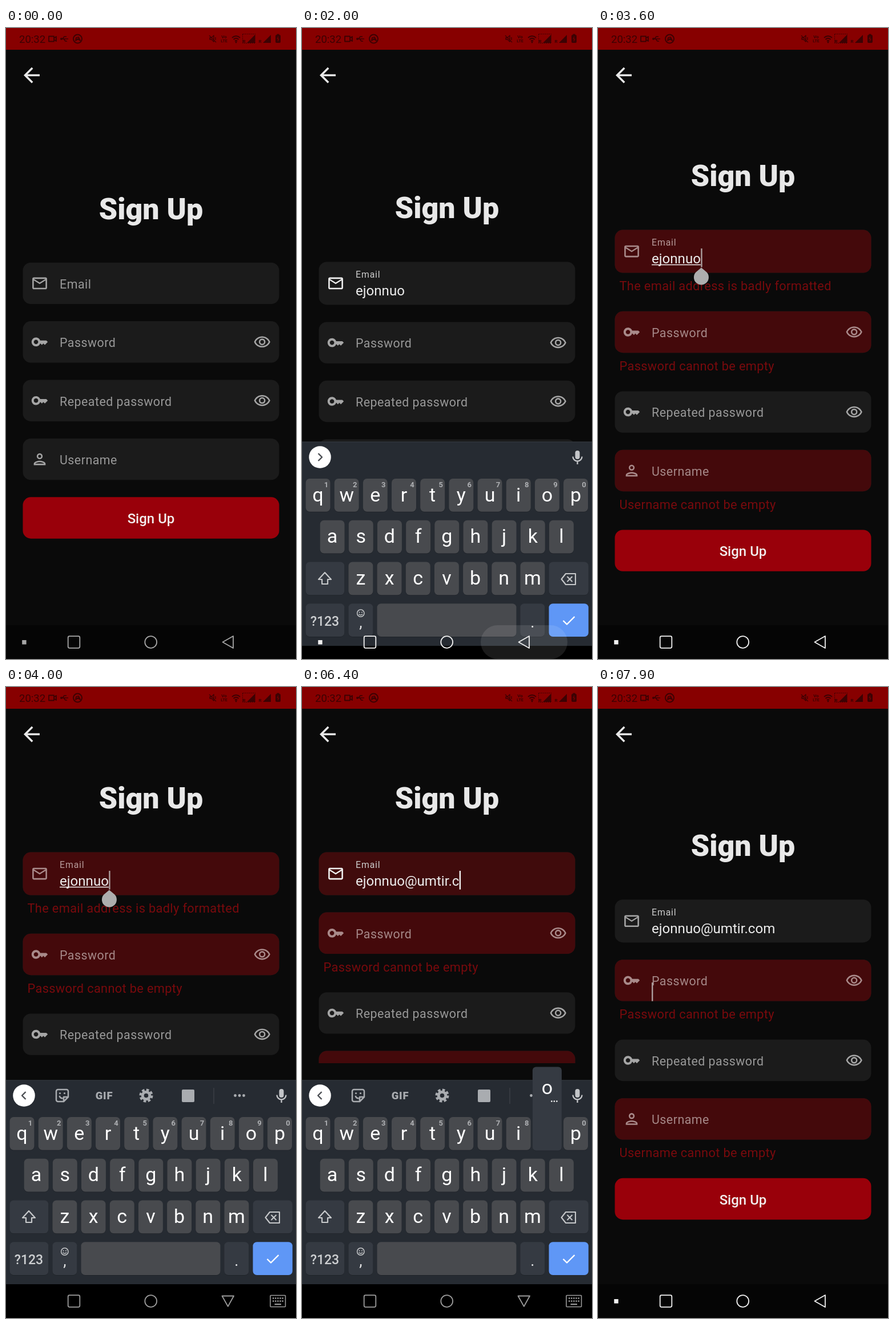
Animation of 508x1102 px, one loop 8000 ms. Source, as an HTML page:

```html
<!DOCTYPE html>
<html lang="en">
<head>
<meta charset="utf-8">
<title>Sign up form</title>
<style>
  html, body { margin: 0; width: 100%; height: 100%; overflow: hidden; background: #0a0a0a; }
  svg { display: block; width: 508px; height: 1102px; font-family: Roboto, sans-serif; }
  text { white-space: pre; }
  .title { font-size: 51.9px; font-weight: 900; fill: #e8e8e8; }
  .body { font-size: 21.8px; letter-spacing: .33px; }
  .typed { font-size: 24.1px; fill: #ededed; }
  .button { font-size: 24px; font-weight: 500; fill: #f2eeee; }
  .key { font-size: 34px; fill: #fff; }
  .hint { font-size: 13px; font-weight: 700; fill: #aeb0b3; }
  .mode { font-size: 23px; font-weight: 500; fill: #cdcfd1; }
  .mid { text-anchor: middle; }
  .line { fill: none; stroke-linejoin: round; }
</style>
</head>
<body>
<svg id="stage" viewBox="0 0 508 1102"></svg>
<script>
const LOOP = 8000, TICK = 100;
const stage = document.getElementById('stage');
const ruler = document.createElement('canvas').getContext('2d');

// Key presses: time and character; the text follows one tick later.
const presses = [
  [800, 'e'], [900, 'j'], [1000, 'o'], [1100, 'n'], [1300, 'n'], [1400, 'u'], [1500, 'o'],
  [4600, '@'], [4900, 'u'], [5100, 'm'], [5200, 't'], [5400, 'i'], [5500, 'r'],
  [6100, '.'], [6200, 'c'], [6400, 'o'], [6600, 'm']
];

// Linear tracks: [time, value] pairs.
const tracks = {
  keyboard: [[400, 0], [700, 1], [1900, 1], [2000, .9], [2200, 0], [3700, 0], [4000, 1], [7200, 1], [7300, .9], [7500, 0]],
  lift: [[500, 0], [700, 1], [1800, 1], [1900, 0], [3800, 0], [4000, 1], [7100, 1], [7200, 0]],
  float: [[300, 0], [600, 1]],
  tools: [[1200, 1], [1500, 0], [3600, 0], [3700, 1]],
  red: [[2500, 0], [2900, 1]],
  emailRed: [[2500, 0], [2900, 1], [6300, 1], [6400, .9], [6700, 0]],
  error: [[2500, 0], [3000, 1]],
  emailError: [[2500, 0], [3000, 1], [6200, 1], [6400, 0]],
  press: [[2400, 0], [2500, .16], [2900, 0]],
  ripple: [[1800, 0], [1900, .07], [2000, .1], [2100, .07], [2200, 0], [7100, 0], [7200, .07], [7300, .1], [7400, .07], [7500, 0]]
};

const icons = {
  arrow: 'M20 11H7.83l5.59-5.59L12 4l-8 8 8 8 1.41-1.41L7.83 13H20z',
  mail: 'M22 6c0-1.1-.9-2-2-2H4c-1.1 0-2 .9-2 2v12c0 1.1.9 2 2 2h16c1.1 0 2-.9 2-2zm-2 0l-8 5-8-5zm0 12H4V8l8 5 8-5z',
  key: 'M21 10h-8.35C11.83 7.67 9.61 6 7 6c-3.31 0-6 2.69-6 6s2.69 6 6 6c2.61 0 4.83-1.67 5.65-4H13l2 2 2-2 2 2 4-4.04zM7 15c-1.65 0-3-1.35-3-3s1.35-3 3-3 3 1.35 3 3-1.35 3-3 3z',
  eye: 'M12 4C7 4 2.7 7.1 1 11.5 2.7 15.9 7 19 12 19s9.3-3.1 11-7.5C21.3 7.1 17 4 12 4zM12 6c3.8 0 7.2 2.1 8.8 5.5-1.6 3.4-5 5.5-8.8 5.5s-7.2-2.1-8.8-5.5C4.8 8.1 8.2 6 12 6zM12 7a4.5 4.5 0 1 0 0 9 4.5 4.5 0 1 0 0-9zm0 2a2.5 2.5 0 1 1 0 5 2.5 2.5 0 1 1 0-5z',
  user: 'M12 4a4 4 0 1 0 0 8 4 4 0 1 0 0-8zm0 2a2 2 0 1 1 0 4 2 2 0 1 1 0-4zM12 14c-2.7 0-8 1.3-8 4v2h16v-2c0-2.7-5.3-4-8-4zm0 2c2.7 0 5.8 1.3 6 2H6c.2-.7 3.3-2 6-2z'
};

const lerp = (a, b, k) => a + (b - a) * k;

function at(name, t) {
  const track = tracks[name], next = track.findIndex(p => p[0] > t);
  if (next === 0) return track[0][1];
  if (next < 0) return track[track.length - 1][1];
  const [t0, a] = track[next - 1], [t1, b] = track[next];
  return lerp(a, b, (t - t0) / (t1 - t0));
}

const rect = (x, y, w, h, r, fill, more = '') =>
  `<rect x="${x}" y="${y}" width="${w}" height="${h}" rx="${r}" fill="${fill}" ${more}/>`;
const text = (x, y, cls, str, more = '') =>
  `<text x="${x}" y="${y}" class="${cls}" ${more}>${str.replace(/&/g, '&amp;').replace(/</g, '&lt;')}</text>`;
const line = (d, color, width = 2, more = '') =>
  `<path class="line" d="${d}" stroke="${color}" stroke-width="${width}" ${more}/>`;
const circle = (x, y, r, more) => `<circle cx="${x}" cy="${y}" r="${r}" ${more}/>`;
const icon = (name, x, y, color, scale = 1.29) =>
  `<path d="${icons[name]}" fill="${color}" fill-rule="evenodd" transform="translate(${x - 12 * scale} ${y - 12 * scale}) scale(${scale})"/>`;

function statusBar() {
  const ink = '#3c0203', ring = `fill="none" stroke="${ink}" stroke-width="2"`;
  const signal = x => `<path d="M${x} 26v-14l-14 14z" fill="${ink}"/>`;
  return rect(0, 0, 508, 38, 0, '#870000') +
    text(23, 26, '', '20:32', `font-size="18.5" fill="${ink}"`) +
    line('M75 14.5h9v9h-9zM84 18l4-3v8l-4-3', ink, 1.8) +
    line('M96 19h13M99 19l3-4h4M101 19l3 4h3', ink, 1.6) + circle(97, 19, 2, `fill="${ink}"`) +
    circle(125.5, 19, 7.5, ring) + line('M122 22l1-5 4-1 3 6-4-3z', ink, 1.8) +
    line('M357 17h3l4-4v11l-4-4h-3zM356 13l12 12M367 16v5', ink, 1.3) +
    text(382, 18, 'mid', 'Vo', `font-size="8" font-weight="700" fill="${ink}"`) +
    text(382, 25, 'mid', 'LTE', `font-size="7" font-weight="700" fill="${ink}"`) +
    line('M396 17q7-6 14 0M398.5 20q4.5-4 9 0M401 23q2-2 4 0', ink, 1.8) +
    circle(403, 25, 1.4, `fill="${ink}"`) +
    rect(414.5, 10.5, 22, 16, 0, 'none', `stroke="${ink}" stroke-dasharray="2 1.5"`) +
    signal(436) + signal(464) +
    [417, 445].map(x => text(x, 26, 'mid', 'R', `font-size="8" font-weight="700" fill="${ink}"`)).join('') +
    rect(472, 12, 9, 14, 2, ink) + rect(474.5, 10.5, 4, 2, 0, ink) + line('M477 15l-2 4h3l-2 4', '#870000', 1);
}

function field(y, h, glyph, label, o = {}) {
  const { red = 0, float = 0, error = false, focus = false, eye = false, value = '' } = o;
  const mid = y + h / 2;
  const dim = error ? '#a98a8a' : '#a6a6a6';
  const labelColor = float > .5 ? (error ? '#b89c9c' : '#cccccc') : error ? '#a58888' : '#989898';
  const size = lerp(21.4, 15.8, float), spacing = lerp(.48, .9, float);
  return rect(29.5, y, 449, h, 14, '#1b1b1b') +
    (red ? rect(29.5, y, 449, h, 14, '#44090b', `opacity="${red}"`) : '') +
    icon(glyph, 59, mid, focus && !error ? '#f0f0f0' : dim) +
    text(94, y + lerp(45, 27.5, float), '', label,
      `font-size="${size}" letter-spacing="${spacing}" fill="${labelColor}"`) +
    text(94, y + 58.5, 'typed', value) +
    (eye ? icon('eye', 448.7, mid + .5, dim) : '');
}

const message = (y, str, alpha) =>
  alpha ? text(37.5, y + 30.5, 'body', str, `fill="#780a0d" opacity="${alpha}"`) : '';

function form(t) {
  const float = at('float', t), red = at('red', t), error = at('error', t), emailError = at('emailError', t);
  const H = 72.4, GAP = 30, NOTE = 37.2;
  const emailH = H + 2.6 * float;
  const extra = emailH - H + NOTE * (emailError + 2 * error);
  const lift = at('lift', t);
  const top = lerp(409.7 - extra / 2, 288.6, lift);
  const pass = top + emailH + GAP + NOTE * emailError;
  const again = pass + H + GAP + NOTE * error;
  const user = again + H + GAP;
  const button = user + H + GAP + NOTE * error;

  const value = presses.filter(p => p[0] < t).map(p => p[1]).join('');
  ruler.font = '24.1px Roboto, sans-serif';
  const end = 94 + ruler.measureText(value).width;
  const marked = t >= 3600 && t < 4700;
  const focus = (t >= 400 && t < 2500) || (t >= 3600 && t < 7900);
  const bad = t >= 2600 && t < 6300;
  const hidden = (t >= 1900 && t < 2500) || (t >= 7500 && t < 7700);
  const cursor = (x, y, color) => rect(x, y, 2.4, 32.6, 0, color);

  let out = text(254, top - 76.2, 'title mid', 'Sign Up') +
    field(top, emailH, 'mail', 'Email', { red: at('emailRed', t), float, error: bad, focus, value }) +
    message(top + emailH, 'The email address is badly formatted', emailError) +
    field(pass, H, 'key', 'Password', { red, error: red > 0, eye: true }) +
    message(pass + H, 'Password cannot be empty', error) +
    field(again, H, 'key', 'Repeated password', { eye: true }) +
    field(user, H, 'user', 'Username', { red, error: red > 0 }) +
    message(user + H, 'Username cannot be empty', error) +
    rect(29.5, button, 449, H, 14, '#99000a') +
    rect(29.5, button, 449, H, 14, '#fff', `opacity="${at('press', t)}"`) +
    text(254, button + 45.8, 'button mid', 'Sign Up');

  if (marked) {
    const y = top + 82;
    out += line(`M94 ${top + 61}H${end}`, '#ededed', 1.5) +
      `<path d="M${end + 1} ${y - 16}l9.5 8a13 13 0 1 1-19 0z" fill="#adadad"/>`;
  }
  if (focus && float > .6 && !hidden) out += cursor(end + (value ? .3 : 0), top + 32.4, bad ? '#ab9d9d' : '#f2f2f2');
  if (t >= 7900) out += cursor(94, pass + 39.8, '#ab9d9d');

  const clip = lift === 1 ? 657 : 1043;
  return `<clipPath id="body"><rect y="38" width="508" height="${clip - 38}"/></clipPath>
    <g clip-path="url(#body)">${out}</g>`;
}

const PITCH = 50.17, KEY_W = 43, KEY_H = 57.8;
const rowY = [751, 823.8, 896.4, 969.2];
const pages = {
  letters: ['qwertyuiop', 'asdfghjkl', 'zxcvbnm'],
  symbols: ['1234567890', '@#$_&-+()/', '*"\':;!?']
};
const rowX = [r => 6.5, r => r.length > 9 ? 6.5 : 31.6, r => 81.4];

// Left, top and row of a key on the given page.
function keyPlace(rows, ch) {
  const row = rows.findIndex(r => r.includes(ch));
  if (row < 0) return [382.3, rowY[3], 3];
  return [rowX[row](rows[row]) + rows[row].indexOf(ch) * PITCH, rowY[row], row];
}

function toolbar(t) {
  const show = at('tools', t), ink = '#a9acb0';
  return circle(31.5, 713.5, 19.3, 'fill="#fff"') +
    line('M34.5 707l-6.5 6.5 6.5 6.5', '#4a4d52', 2.4, `transform="rotate(${180 * (1 - show)} 31.5 713.5)"`) +
    `<g opacity="${show}">` +
    line('M91 703h15a3 3 0 0 1 3 3v10l-8 8H91a3 3 0 0 1-3-3v-15a3 3 0 0 1 3-3zM101 723v-7h7M93.5 714q2 5 6 4', ink, 2.5) +
    circle(94.5, 709.5, 1.6, `fill="${ink}"`) + circle(102.5, 709.5, 1.6, `fill="${ink}"`) +
    text(172, 720, 'mid', 'GIF', `font-size="18.5" font-weight="900" letter-spacing=".8" fill="${ink}"`) +
    circle(245.5, 713.5, 6.3, `fill="none" stroke="${ink}" stroke-width="5"`) +
    circle(245.5, 713.5, 10, `fill="none" stroke="${ink}" stroke-width="4" stroke-dasharray="4.6 3.254"`) +
    rect(308, 703, 22, 22, 2, ink) +
    rect(363.5, 700, 1, 28, 0, '#44494f') +
    [401.5, 409, 416.5].map(x => circle(x, 713.5, 2.4, `fill="${ink}"`)).join('') + '</g>' +
    rect(478.5, 702, 8, 15, 4, '#c3c5c8') +
    line('M474.5 712.5a8 8 0 0 0 16 0M482.5 720v6', '#c3c5c8', 2.3);
}

function keyboard(t) {
  const open = at('keyboard', t);
  if (!open) return '';
  const symbols = t >= 4500 && t < 4700;
  const rows = symbols ? pages.symbols : pages.letters;
  const dark = '#353a42', plain = '#484a4e', ink = '#c6c8ca';
  let out = rect(0, 686.5, 508, 356.5, 0, '#262b32') + rect(0, 686.5, 508, 1, 0, '#343a41') + toolbar(t);
  const cap = (x, y, w, fill) => rect(x, y + .7, w, KEY_H, 7, '#1d2126') + rect(x, y, w, KEY_H, 7, fill);

  rows.forEach((row, r) => [...row].forEach((ch, i) => {
    const [x, y] = keyPlace(rows, ch);
    out += cap(x, y, KEY_W, plain) + text(x + KEY_W / 2, y + 39.5, 'key mid', ch);
    if (!r && !symbols) out += text(x + 36, y + 14.8, 'hint mid', String((i + 1) % 10));
  }));

  out += cap(6.5, rowY[2], 67.8, dark) + cap(432.5, rowY[2], 69.3, dark) +
    cap(6.5, rowY[3], 67.8, dark) + cap(81.4, rowY[3], KEY_W, dark) +
    cap(131.5, rowY[3], 244, plain) + cap(382.3, rowY[3], KEY_W, dark) +
    rect(432.5, rowY[3], 69.3, KEY_H, 7, '#5f97f6') +
    (symbols ? text(40, 934, 'mode mid', '=\\<') : line('M40 915l11 12h-6v8h-10v-8h-6z', ink, 2.2)) +
    line('M462 917h17v19h-17l-7.5-9.5zM464.5 922l9 9M473.5 922l-9 9', ink, 2.1) +
    text(40, 1007.5, 'mode mid', symbols ? 'ABC' : '?123') +
    circle(102.8, 986, 6.2, `fill="none" stroke="${ink}" stroke-width="1.5"`) +
    circle(100.6, 984.5, 1, `fill="${ink}"`) + circle(105, 984.5, 1, `fill="${ink}"`) +
    line('M99.5 987.5q3.3 3.5 6.6 0', ink, 1.4) +
    text(102.8, 1011, 'mid', ',', 'font-size="27" fill="#e4e5e6"') +
    text(403.8, 1011, 'mid', '.', 'font-size="27" fill="#e4e5e6"') +
    line('M457.5 999l6.5 6.5 13.5-13.5', '#fff', 2.4);

  const hit = presses.find(p => p[0] === t);
  if (hit) {
    const [x, y, row] = keyPlace(rows, hit[1]), left = Math.max(2, x - 4);
    out += rect(left, y - 86.5, 51, 146, 6, '#1d2126', 'opacity=".5"') +
      rect(left, y - 87.5, 51, 146, 6, '#353a42') +
      text(left + 25.5, y - 40, 'key mid', hit[1]);
    if (row === 0) out += [33.5, 38, 42.5].map(d => circle(left + d, y - 27.5, 1.3, 'fill="#fff"')).join('');
  }
  return `<g transform="translate(0 ${(1 - open) * 360})">${out}</g>`;
}

function navBar(t) {
  const open = at('keyboard', t) === 1;
  const ink = open ? '#9b9b9b' : t < 400 ? '#a6a6a6' : '#f0f0f0';
  let out = rect(313, 1043, 152, 59, 29.5, '#fff', `opacity="${at('ripple', t)}"`) +
    rect(108.7, 1062.2, 20.6, 20.6, 2.5, 'none', `stroke="${ink}" stroke-width="1.8"`) +
    circle(253.7, 1072.5, 10.4, `fill="none" stroke="${ink}" stroke-width="1.8"`);
  if (!open) return out + line('M379.5 1072.5l18.5-10.5v21z', ink, 1.8) + rect(28.2, 1069, 7.4, 7.4, .5, ink);
  out += line('M378.5 1063.5h20.5l-10.2 18.3z', ink, 1.8) +
    rect(463, 1062.5, 26.5, 20, 1, 'none', `stroke="${ink}" stroke-width="1.6"`);
  return out + line('M467 1067.5h19M467 1072.5h19', ink, 2.4, 'stroke-dasharray="2.4 1.7"') +
    line('M470.5 1078h11.5', ink, 2.2);
}

function draw(t) {
  stage.innerHTML = rect(0, 0, 508, 1102, 0, '#0a0a0a') +
    form(t) + statusBar() + icon('arrow', 45, 82.5, '#e8e8e8', 1.75) +
    rect(0, 1043, 508, 59, 0, at('keyboard', t) ? '#000' : '#050505') +
    keyboard(t) + navBar(t);
}

let shown = -1;
function frame() {
  const t = Math.floor(performance.now() % LOOP / TICK) * TICK;
  if (t !== shown) draw(shown = t);
  requestAnimationFrame(frame);
}
frame();
</script>
</body>
</html>
```
